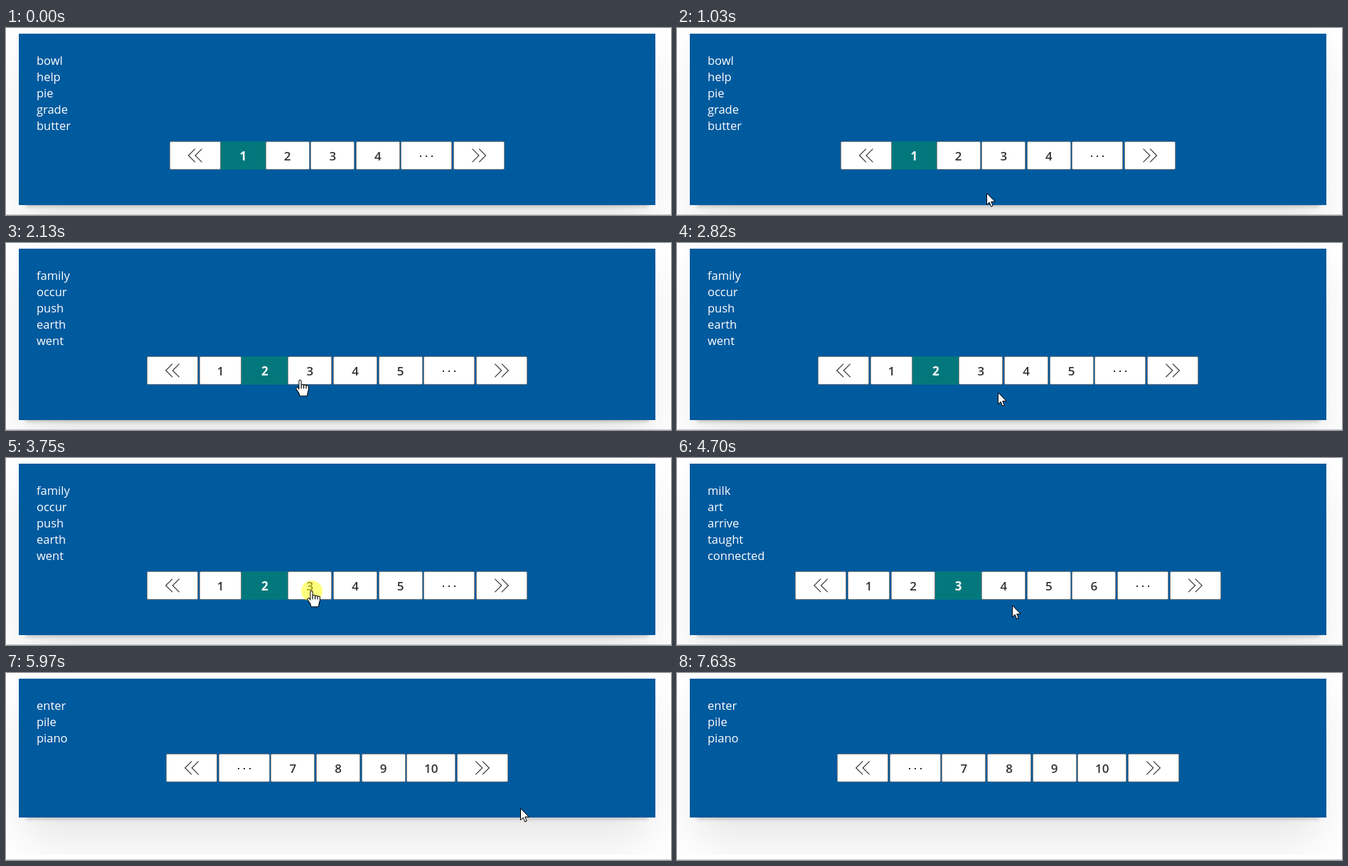
These frames come from a looping animation (935x264 px, 9.42 s). An HTML page with a canvas:

```html
<!DOCTYPE html>
<html lang="en">
<head>
<meta charset="utf-8">
<title>Pagination</title>
<style>
  html, body { margin: 0; width: 100%; height: 100%; overflow: hidden; background: #fff; }
  canvas { display: block; }
</style>
</head>
<body>
<canvas id="stage" width="935" height="264"></canvas>
<script>
const ctx = document.getElementById('stage').getContext('2d');
const LOOP = 9420, STEP = 75;
const FONT = '"Open Sans", "Noto Sans", sans-serif';
const BLUE = '#005a9e', INK = '#323130';
const LAST_PAGE = 10, MID_X = 465.5, GAP = 1.6, LINE = 23, BUTTON_H = 40;

const pages = [
  { from: 0, active: 1, first: 1, last: 4, hover: true, words: 'bowl help pie grade butter' },
  { from: 1920, active: 2, first: 1, last: 5, hover: false, words: 'family occur push earth went' },
  { from: 3930, active: 3, first: 1, last: 6, hover: true, words: 'milk art arrive taught connected' },
  { from: 5970, active: 0, first: 7, last: 10, hover: true, words: 'enter pile piano' }
].map(layOut);

// Pointer legs: start, end, destination
const ENTRY = [445, 245], POINTER_OUT = 7630;
const legs = [
  [900, 1350, 396, 185],
  [1920, 2360, 441, 209],
  [2600, 2820, 453, 211],
  [2920, 3000, 430, 176],
  [3075, 3140, 437, 196],
  [3520, 3610, 430, 188],
  [3930, 4160, 437, 199],
  [4700, 4700, 471, 208],
  [4775, 5250, 723, 185],
  [5970, 6230, 721, 224],
  [7270, 7560, 768, 260]
];
const presses = [[1840, 1920], [3750, 3930], [5860, 5910]];

function buttonWidth(label) {
  if (isNaN(label)) return 72;
  return label === '1' ? 59.5 : label.length > 1 ? 69 : 62;
}

function layOut(page) {
  const words = page.words.split(' ');
  const top = 45 + LINE * words.length;
  const labels = ['<<'];
  if (page.first > 1) labels.push('...');
  for (let n = page.first; n <= page.last; n++) labels.push(String(n));
  if (page.last < LAST_PAGE) labels.push('...');
  labels.push('>>');

  const total = labels.reduce((sum, label) => sum + buttonWidth(label) + GAP, -GAP);
  let x = MID_X - total / 2;
  const buttons = labels.map(label => {
    const w = buttonWidth(label);
    const grow = label === String(page.active) ? GAP : 0;
    const button = { label, active: grow > 0,
      left: Math.round(x - grow), right: Math.round(x + w + grow), mid: x + w / 2 };
    x += w + GAP;
    return button;
  });
  return { ...page, words, top, bottom: top + 90, buttons };
}

function pointerAt(t) {
  if (t < legs[0][0] || t >= POINTER_OUT) return null;
  const i = legs.findLastIndex(leg => leg[0] <= t);
  const [start, end, x, y] = legs[i];
  const [x0, y0] = i ? legs[i - 1].slice(2) : ENTRY;
  const steps = Math.round((end - start) / STEP) + 1;
  const p = Math.min((Math.floor((t - start) / STEP) + 1) / steps, 1);
  const ease = p * p * (3 - 2 * p);
  return [Math.round(x0 + (x - x0) * ease), Math.round(y0 + (y - y0) * ease)];
}

function trace(points) {
  ctx.beginPath();
  points.forEach(([x, y]) => ctx.lineTo(x, y));
}

function roundBox(x, y, w, h, r, fill) {
  ctx.fillStyle = fill;
  ctx.beginPath();
  ctx.roundRect(x, y, w, h, r);
  ctx.fill();
}

function dropShadow(bottom, dy, blur, alpha) {
  ctx.shadowColor = `rgba(0,0,0,${alpha})`;
  ctx.shadowOffsetY = dy;
  ctx.shadowBlur = blur;
  ctx.fillRect(28, 8, 875, bottom - 8);
}

function drawPanel({ words, bottom }) {
  ctx.save();
  ctx.beginPath();
  ctx.rect(0, 0, 935, bottom + 53);
  ctx.clip();
  ctx.fillStyle = BLUE;
  dropShadow(bottom, 31, 62, 0.1);
  dropShadow(bottom, 2.5, 5, 0.2);
  ctx.restore();
  ctx.fillStyle = BLUE;
  ctx.fillRect(18, 8, 895, bottom - 8);

  ctx.fillStyle = '#fff';
  ctx.font = `500 16.5px ${FONT}`;
  ctx.textAlign = 'left';
  words.forEach((word, i) => ctx.fillText(word, 43, 52 + LINE * i));
}

function drawChevrons(cx, cy, dir) {
  ctx.strokeStyle = INK;
  ctx.lineWidth = 1.1;
  for (const dx of [-4.8, 4.8]) {
    const back = cx + dx - 4.7 * dir;
    trace([[back, cy - 9.4], [cx + dx + 4.7 * dir, cy], [back, cy + 9.4]]);
    ctx.stroke();
  }
}

function drawLabel({ label, active, mid }, cy) {
  ctx.fillStyle = active ? '#fff' : INK;
  if (label === '...') {
    for (const dx of [-8, 0, 8]) ctx.fillRect(Math.round(mid + dx) - 1, cy, 2, 2);
  } else if (isNaN(label)) {
    drawChevrons(mid, cy, label === '>>' ? 1 : -1);
  } else {
    ctx.font = `${active ? 700 : 600} 17px ${FONT}`;
    ctx.textAlign = 'center';
    ctx.fillText(label, mid, cy + 7);
  }
}

function drawButton(button, top, lit) {
  const { left, right, active } = button, w = right - left;
  if (active) {
    roundBox(left, top, w, BUTTON_H, 1, '#03787c');
  } else {
    roundBox(left, top, w, BUTTON_H, 2, '#8a8886');
    roundBox(left + 1, top + 1, w - 2, BUTTON_H - 2, 1, lit ? '#edebe9' : '#fff');
  }
  drawLabel(button, top + BUTTON_H / 2);
}

function drawArrow() {
  trace([[0, 0], [0, 16], [3.7, 12.6], [6.2, 18.6], [8.7, 17.5], [6.2, 11.7], [11.3, 11.5]]);
  ctx.closePath();
  ctx.fillStyle = '#fff';
  ctx.strokeStyle = '#000';
  ctx.lineWidth = 1;
  ctx.fill();
  ctx.stroke();
}

// Thick round lines: a black pass, then a thinner white one inside it
function drawHand() {
  for (const [color, width] of [['#000', 4.2], ['#fff', 2.2]]) {
    ctx.strokeStyle = ctx.fillStyle = color;
    ctx.lineWidth = width;
    for (let i = 0; i < 4; i++) {
      trace([[3.4 * i, i ? 7 + 0.7 * i : 1.5], [3.4 * i, 14]]);
      ctx.stroke();
    }
    trace([[-4, 12], [0, 18]]);
    ctx.stroke();
    trace([[0, 13], [10, 13], [8.5, 21], [0.5, 21]]);
    ctx.closePath();
    ctx.fill();
    ctx.stroke();
  }
}

function drawPointer([x, y], isHand) {
  const nudge = isHand ? -0.5 : 0.5;
  ctx.save();
  ctx.translate(x + nudge, y + nudge);
  ctx.lineJoin = ctx.lineCap = 'round';
  if (isHand) drawHand(); else drawArrow();
  ctx.restore();
}

function draw(t) {
  const page = pages.findLast(p => p.from <= t);
  const tip = pointerAt(t);
  const target = tip && tip[1] >= page.top && tip[1] < page.top + BUTTON_H &&
    page.buttons.find(b => tip[0] >= b.left && tip[0] < b.right);

  ctx.fillStyle = '#fff';
  ctx.fillRect(0, 0, 935, 264);
  drawPanel(page);
  ctx.fillStyle = '#c8c8c8';
  ctx.fillRect(0, 263, 935, 1);
  page.buttons.forEach(b => drawButton(b, page.top, page.hover && b === target));

  if (!tip) return;
  if (presses.some(([from, to]) => t >= from && t < to)) {
    ctx.fillStyle = 'rgba(255,255,0,0.5)';
    ctx.beginPath();
    ctx.arc(tip[0], tip[1], 15, 0, Math.PI * 2);
    ctx.fill();
  }
  drawPointer(tip, Boolean(target));
}

const began = performance.now();
function tick() {
  draw((performance.now() - began) % LOOP);
  requestAnimationFrame(tick);
}
tick();
</script>
</body>
</html>
```
